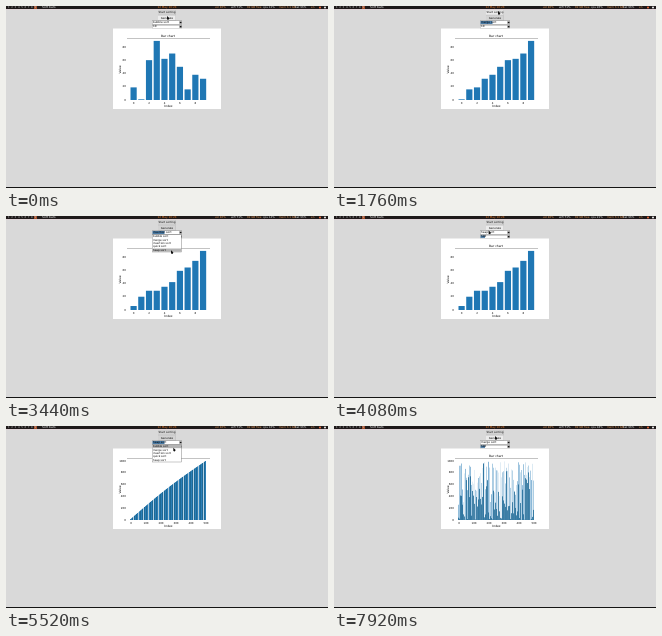
An HTML page with a canvas that plays this animation: 322 by 182 pixels, repeating every 8 s.

```html
<!DOCTYPE html>
<html lang="en">
<head>
<meta charset="utf-8">
<title>Bar chart</title>
<style>
html, body { margin: 0; width: 100%; height: 100%; overflow: hidden; background: #d9d9d9; }
canvas { display: block; width: 322px; height: 182px; }
</style>
</head>
<body>
<canvas id="stage"></canvas>
<script>
const LOOP = 8000, BLUE = '#1f77b4', DEEP = '#12618f', ROW = 3.4, COLUMNS = 76;
const canvas = document.getElementById('stage');
const g = canvas.getContext('2d');
const dpr = window.devicePixelRatio || 1;
canvas.width = 322 * dpr;
canvas.height = 182 * dpr;

const sorts = ['bubble sort', 'merge sort', 'insertion sort', 'quick sort', 'heap sort'];
const sets = [
  [19, 1, 60, 89, 62, 70, 50, 16, 38, 32],
  [42, 6, 74, 29, 59, 20, 89, 35, 64, 29]
];

let seed = 17;
const random = () => (seed = seed * 16807 % 2147483647) / 2147483647;
const dense = Array.from({ length: COLUMNS }, () => ({
  tall: 0.25 + 0.75 * Math.sqrt(random()),
  share: random() ** 1.3,
  tint: 0.1 + 0.45 * random()
}));

const spots = { make: [161, 10], run: [164, 5], list: [174, 15], count: [148, 19], away: [202, 14] };
// Arrival time and place; a number is a row of the open list
const visits = [
  [0, 'make'], [1000, 'list'], [1200, 1], [1600, 'run'],
  [2080, 'list'], [2400, 2], [2640, 'make'], [3000, 'run'],
  [3220, 'list'], [3440, 4], [3840, 'count'], [4200, 'make'], [4500, 'run'],
  [5300, 'list'], [5600, 1], [5950, 'make'], [6500, 'away'],
  [7200, 'count'], [7800, 'make']
];
const spot = place => spots[place] || [165, 20.6 + ROW * place];

function pointer(t) {
  const next = visits.findIndex(v => v[0] > t);
  if (next < 0) return spot(visits.at(-1)[1]);
  const [x0, y0] = spot(visits[next - 1][1]);
  const [x1, y1] = spot(visits[next][1]);
  const k = Math.max(0, 1 - (visits[next][0] - t) / 240);
  const e = k * k * (3 - 2 * k);
  return [x0 + (x1 - x0) * e, y0 + (y1 - y0) * e];
}

function stateAt(t) {
  const s = { made: 0, size: 10, shown: 10, choice: 0, focus: '', sorted: false, open: false };
  for (const [time, place] of visits) {
    if (time > t) break;
    s.open = place === 'list' || (typeof place === 'number' && t < time + 160);
    if (place === 'make') { s.made++; s.shown = s.size; s.sorted = false; }
    else if (place === 'run') s.sorted = true;
    else if (place === 'list') s.focus = 'list';
    else if (place === 'count') { s.focus = 'count'; s.size = 500; }
    else if (!s.open && place !== 'away') s.choice = place;
  }
  return s;
}

function box(x, y, w, h, fill) {
  g.fillStyle = fill;
  g.fillRect(x, y, w, h);
}

function label(text, x, y, size = 3, color = '#000', align = 'center') {
  g.font = `${size}px "DejaVu Sans", sans-serif`;
  g.fillStyle = color;
  g.textAlign = align;
  g.textBaseline = 'middle';
  g.fillText(text, x, y);
}

function topBar(t) {
  box(0, 0, 322, 3, '#1f1a1a');
  box(0, 3, 322, 0.6, '#e3cfd4');
  box(28, 0, 3, 3, '#a5502c');
  label('1  2  3  4  5  6  7  8  9', 2, 1.5, 2.6, '#ccc', 'left');
  label('Sort bars', 36, 1.5, 3, '#fff', 'left');
  label('12 May 10:24', 161, 1.5, 2.8, '#f08030');
  const load = 12 + Math.floor(t / 880) * 7 % 19;
  ['vol 40%', 'wifi 71%', '82 GB free', `cpu ${load}%`, 'mem 3.1 GB', 'bat 96%', 'en']
    .forEach((text, i) => label(text, 209 + i * 16, 1.5, 2.7, i % 2 ? '#eee' : '#f0a060', 'left'));
  box(313, 0.7, 2, 1.6, '#e0643a');
  box(318, 0.7, 2, 1.6, '#ddd');
  box(0, 181, 322, 1, '#151515');
}

function button(text, y, hover) {
  box(152, y - 2.5, 18, 5, '#b5b5b5');
  box(152, y - 2.5, 17.6, 4.6, hover ? '#ececec' : '#d3d3d3');
  label(text, 161, y, 2.7);
}

function field(text, y, h, selected, width) {
  box(146, y, 30, h, '#888');
  box(146.4, y + 0.4, 27, h - 0.8, '#fff');
  if (selected) box(146.5, y + 0.5, width, h - 1, '#4a7ba5');
  label(text, 147, y + h / 2, 2.8, '#000', 'left');
  box(173.5, y + 0.4, 2.2, h - 0.8, '#ddd');
  box(173.8, y + h / 2 - 0.8, 1.7, 1.6, '#111');
}

function column(i, height, alpha, color) {
  g.globalAlpha = alpha;
  box(124 + i, 94 - height * 59, 1, height * 59, color);
  g.globalAlpha = 1;
}

function bars(s) {
  if (s.shown === 10) {
    const data = [...sets[s.made - 1]];
    if (s.sorted) data.sort((a, b) => a - b);
    data.forEach((v, i) => box(124.5 + i * 7.72, 94 - v * 0.664, 6.2, v * 0.664, BLUE));
    return;
  }
  dense.forEach((d, i) => {
    const p = (i + 1) / COLUMNS;
    if (s.sorted) {
      column(i, p + 0.04 * Math.sin(Math.PI * p), i % 5 === 3 ? 0.35 : 0.95, i % 2 ? BLUE : DEEP);
    } else {
      column(i, d.tall, d.tint, BLUE);
      column(i, d.tall * d.share, 0.75, DEEP);
    }
  });
}

function chart(s) {
  const big = s.shown > 10;
  box(107, 22.5, 108, 80.5, '#fff');
  box(121, 32.3, 83, 0.7, '#aaa');
  label('Bar chart', 162, 30);
  label('Index', 162.5, 100);
  g.save();
  g.translate(114, 63.5);
  g.rotate(-Math.PI / 2);
  label('Value', 0, 0);
  g.restore();
  bars(s);
  for (let i = 0; i < (big ? 6 : 5); i++) {
    label(i * (big ? 200 : 20), 120, 94 - i * (big ? 11.8 : 13.28), 2.7, '#000', 'right');
    label(i * (big ? 100 : 2), big ? 125 + i * 15 : 127.6 + i * 15.44, 97.3, 2.7);
  }
}

function menu(y) {
  box(146, 18.5, 29.5, 17.7, '#777');
  box(146.4, 18.9, 28.7, 16.9, '#fff');
  const hot = Math.max(0, Math.min(4, Math.floor((y - 18.9) / ROW)));
  box(146.4, 18.9 + hot * ROW, 28.7, 3.3, '#b4b4b4');
  sorts.forEach((name, i) => label(name, 147, 20.6 + i * ROW, 2.7, '#000', 'left'));
}

function arrow(x, y) {
  g.beginPath();
  g.moveTo(x, y);
  g.lineTo(x, y + 3.4);
  g.lineTo(x + 1.5, y + 3.8);
  g.lineTo(x + 2.4, y + 2.3);
  g.fillStyle = '#111';
  g.fill();
}

function draw(t) {
  g.setTransform(dpr, 0, 0, dpr, 0, 0);
  box(0, 0, 322, 182, '#d9d9d9');
  const s = stateAt(t);
  const [x, y] = pointer(t);
  const over = row => x > 152 && x < 170 && Math.abs(y - row) < 2.5;
  topBar(t);
  button('Start sorting', 6.7, over(6.7));
  button('Generate', 12, over(12));
  field(sorts[s.choice], 14.5, 4, s.focus === 'list', 12);
  field(s.size, 19, 3.4, s.focus === 'count', 4.5);
  chart(s);
  if (s.open) menu(y);
  arrow(x, y);
}

function tick(now) {
  draw(now % LOOP);
  requestAnimationFrame(tick);
}
requestAnimationFrame(tick);
</script>
</body>
</html>
```
